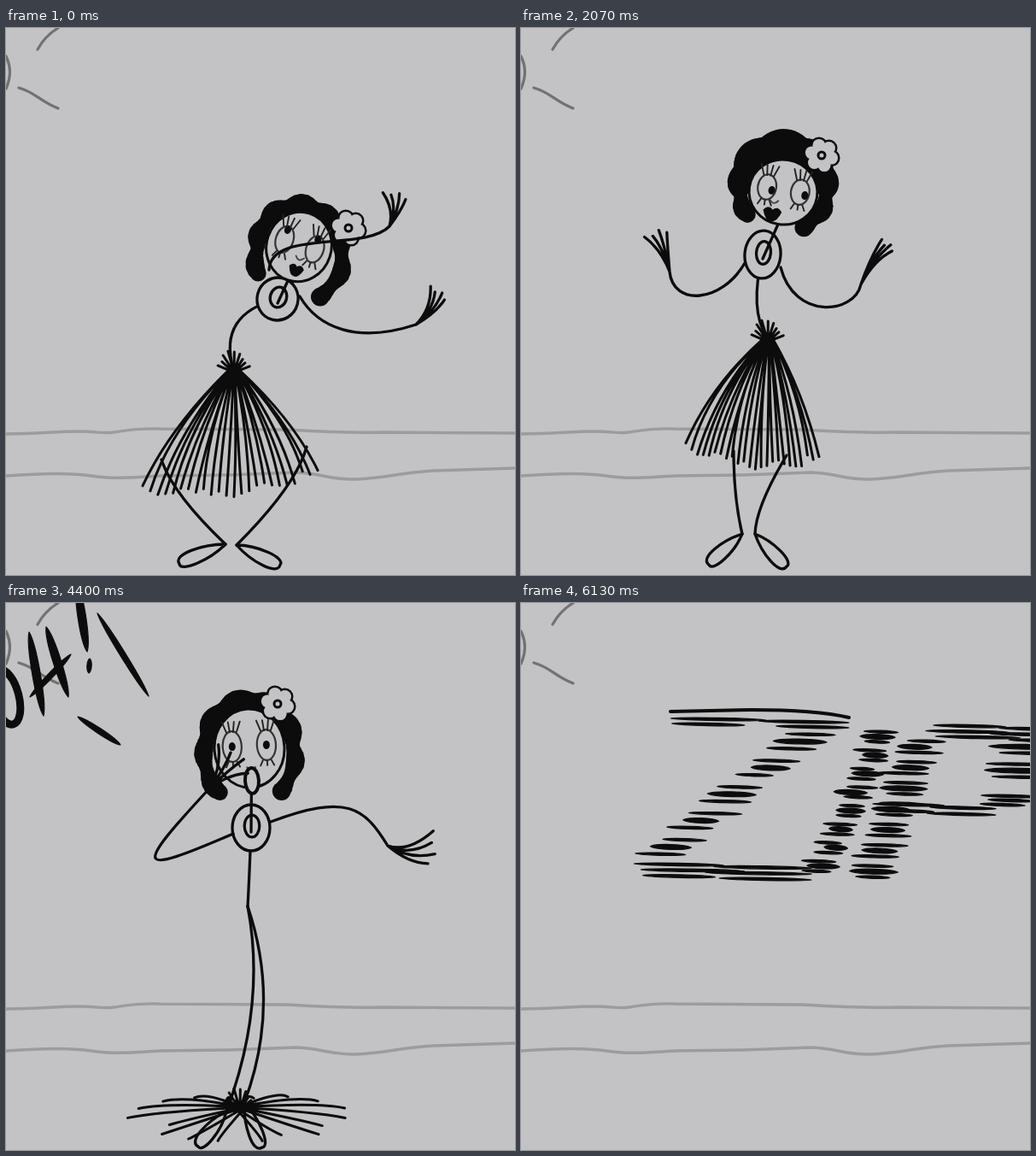
These frames come from a looping animation (596 by 640 pixels, 6.19 s). An HTML page:

```html
<!DOCTYPE html>
<html lang="en">
<head>
<meta charset="utf-8">
<title>Hula dancer</title>
<style>
html, body { margin: 0; width: 100%; height: 100%; overflow: hidden; background: #c3c3c5; }
svg { display: block; width: 100vw; height: 100vh; }
path, ellipse { stroke-linecap: round; stroke-linejoin: round; }
</style>
</head>
<body>
<svg viewBox="0 0 596 640" preserveAspectRatio="xMidYMid slice">
  <g fill="none" stroke="#9c9c9d" stroke-width="3.4">
    <path d="M0 475C35 475 60 472 85 472S112 475 126 473S150 468 180 469L330 470Q400 474 440 473L596 474"/>
    <path d="M0 524C40 521 75 520 100 524S150 526 180 524L260 523L340 520C370 521 380 529 410 528S465 520 500 518L596 515"/>
  </g>
  <path fill="none" stroke="#727273" stroke-width="3.2" d="M0 33Q9 51 0 71M61 0Q46 9 37 25M15 70C34 75 40 86 61 94"/>
  <g id="dancer" fill="none" stroke="#0c0c0c" stroke-width="3.3"></g>
  <g id="words" fill="#0c0c0c"></g>
</svg>
<script>
const LOOP = 6190, STEP = 66.67, PAPER = '#c3c3c5', INK = '#0c0c0c';
const dancer = document.getElementById('dancer');
const words = document.getElementById('words');

// head, lei: x y rx ry tilt     hair: left end, right end (degrees), cap, lock length
// arms: cubic curve             hands: finger angle, spread, length
// legs: hip, bend, ankle, toe   skirt: waist, left hem, right hem
const pose = parts => ({
  features: 0, look: [0, 0], mouth: [0, 28, 9, 7], hair: [145, 65, 4, .2],
  droop: .45, strands: 24, flat: 0, ...parts
});

const right = pose({
  head: [343, 256, 38, 41, 18], look: [0, -12], mouth: [5, 27, 9, 7],
  hair: [147, 67, 1, .3], flower: [401, 234],
  lei: [318, 317, 24, 25, 15], bend: [248, 335], waist: [266, 398],
  armL: [308, 283, 310, 235, 420, 262, 449, 232], handL: [-80, 42, 40],
  armR: [344, 314, 365, 350, 410, 370, 480, 347], handR: [-55, 28, 48],
  legL: [182, 505, 195, 545, 257, 604, 203, 627], legR: [352, 490, 340, 535, 270, 605, 321, 628],
  skirt: [267, 400, 160, 540, 365, 518], droop: .5
});
const left = pose({
  head: [319, 327, 41, 42, 10], look: [2, -12], mouth: [-3, 31, 9, 7],
  hair: [146, 73, 4, .3], flower: [354, 280],
  lei: [286, 394, 34, 21, -22], bend: [228, 425], waist: [223, 466],
  armL: [268, 380, 190, 372, 110, 388, 103, 432], handL: [52, 34, 52],
  armR: [313, 405, 360, 440, 370, 475, 298, 498], handR: [-200, 35, 40],
  legL: [145, 567, 195, 590, 262, 610, 203, 627], legR: [342, 525, 325, 556, 262, 610, 322, 624],
  skirt: [224, 468, 125, 576, 355, 542], droop: .3
});
const open = pose({
  head: [307, 192, 40, 38, 9], look: [6, 3], mouth: [-9, 27, 11, 8],
  hair: [145, 62, 16, 0], flower: [352, 149],
  lei: [283, 265, 21, 28, 5], bend: [267, 330], waist: [288, 362],
  armL: [262, 275, 235, 322, 178, 326, 174, 285], handL: [-110, 32, 50],
  armR: [304, 280, 320, 342, 390, 335, 398, 300], handR: [-56, 18, 58],
  legL: [249, 495, 249, 550, 259, 592, 220, 628], legR: [311, 500, 275, 560, 274, 592, 311, 630],
  skirt: [289, 364, 193, 490, 349, 502]
});
const reach = pose({
  head: [287, 174, 40, 38, 2], look: [0, 8], mouth: [1, 38, 6, 3],
  hair: [138, 45, 9, .15], flower: [317, 132],
  lei: [285, 263, 20, 27, 0], bend: [282, 320], waist: [280, 362],
  armL: [268, 240, 245, 190, 235, 140, 216, 5], handL: [-208, 32, 50],
  armR: [294, 240, 325, 200, 335, 165, 387, 5], handR: [27, 38, 53],
  legL: [280, 362, 278, 490, 264, 580, 228, 633], legR: [280, 362, 318, 470, 277, 580, 300, 637],
  skirt: [274, 590, 150, 616, 402, 612], strands: 18, flat: 1
});
const shock = {
  ...reach,
  head: [285, 170, 41, 46, -3], look: [0, 0], mouth: [1, 38, 8, 15],
  hair: [125, 52, 4, .2], flower: [318, 118],
  lei: [287, 263, 22, 27, 0], bend: [285, 320], waist: [283, 355],
  armL: [266, 270, 150, 320, 148, 314, 240, 215], handL: [-50, 60, 50],
  armR: [310, 256, 400, 222, 420, 240, 447, 284], handR: [3, 42, 56],
  legL: [283, 355, 305, 470, 258, 595, 225, 636], legR: [283, 355, 322, 470, 279, 585, 300, 637]
};
const shy = pose({
  head: [290, 266, 41, 26, 0], features: 10, look: [0, 9], mouth: [-3, 35, 6, 5],
  hair: [155, 35, 22, 0], flower: [319, 226],
  lei: [286, 302, 20, 20, 0], bend: [283, 360], waist: [281, 410],
  armL: [267, 300, 184, 360, 184, 364, 248, 418], handL: [-20, 55, 26],
  armR: [307, 305, 396, 350, 396, 354, 312, 420], handR: [200, 55, 24],
  legL: [253, 440, 246, 520, 257, 592, 222, 632], legR: [300, 440, 298, 530, 273, 590, 306, 635],
  skirt: [276, 420, 203, 512, 348, 525], strands: 16
});

const lerp = (a, b, t) => a + (b - a) * t;
function mix(a, b, t) {
  if (typeof a === 'number') return lerp(a, b, t);
  if (Array.isArray(a)) return a.map((v, i) => lerp(v, b[i], t));
  return Object.fromEntries(Object.keys(a).map(k => [k, mix(a[k], b[k], t)]));
}
const smooth = t => t * t * (3 - 2 * t);
const fall = t => t * t;

const dance = [[0, right], [420, mix(right, left, .6)], [840, mix(right, left, .25)], [1270, left],
  [1670, mix(left, open, .55)], [2070, open], [2400, mix(open, right, .25)], [2730, open]];
const bodyKeys = [...dance, [3130, reach], [3870, reach], [4200, shock], [4930, shock], [5340, shy], [LOOP, shy]];
const skirtKeys = [...dance, [2930, open], [3260, reach, fall], [5000, reach], [5340, shy], [LOOP, shy]];

function track(keys, ms) {
  const i = keys.findIndex(k => k[0] > ms);
  const [t0, a] = keys[i - 1], [t1, b, ease = smooth] = keys[i];
  return mix(a, b, ease((ms - t0) / (t1 - t0)));
}

const hash = n => { const s = Math.sin(n * 127.1 + 3.7) * 43758.5453; return s - Math.floor(s); };
const wobble = (n, size) => (hash(n) - .5) * 2 * size;
const rad = deg => deg * Math.PI / 180;
const polar = (x, y, deg, r) => [x + r * Math.cos(rad(deg)), y + r * Math.sin(rad(deg))];
const nums = (...v) => v.map(n => n.toFixed(2)).join(' ');
const line = (...v) => `M${nums(...v.slice(0, 2))}L${nums(...v.slice(2))}`;
const quad = (...v) => `M${nums(...v.slice(0, 2))}Q${nums(...v.slice(2))}`;
const cubic = (...v) => `M${nums(...v.slice(0, 2))}C${nums(...v.slice(2))}`;
const path = (d, attrs = '') => `<path d="${d}" ${attrs}/>`;
const oval = (x, y, rx, ry, tilt = 0, attrs = '') =>
  `<ellipse rx="${nums(rx)}" ry="${nums(ry)}" transform="translate(${nums(x, y)}) rotate(${nums(tilt)})" ${attrs}/>`;
const SOLID = `fill="${INK}" stroke="none"`, BLANK = `fill="${PAPER}" stroke="none"`;

// Fingers leave along the forearm, then fan out
function drawArm(arm, [angle, spread, length]) {
  const [cx, cy, x, y] = arm.slice(4);
  const forearm = Math.atan2(y - cy, x - cx) * 180 / Math.PI;
  let d = cubic(...arm);
  for (let i = 0; i < 4; i++) {
    const aim = angle + spread * (i / 3 - .5);
    const [kx, ky] = polar(x, y, aim, length * .3);
    d += quad(x, y, ...polar(kx, ky, forearm, length * .28), ...polar(x, y, aim, length * (1 - .08 * (i % 2))));
  }
  return path(d);
}

function drawLeg(leg) {
  const [ax, ay, tx, ty] = leg.slice(4);
  const len = Math.hypot(tx - ax, ty - ay), turn = Math.atan2(ty - ay, tx - ax) * 180 / Math.PI;
  return path(quad(...leg.slice(0, 6))) +
    `<g transform="translate(${nums(ax, ay)}) rotate(${nums(turn)})">` +
    path(cubic(0, 0, len * .4, 10, len * 1.05, 14, len, 0) + `C${nums(len * 1.05, -10, len * .4, -10, 0, 0)}`) + '</g>';
}

function drawSkirt({ skirt: [wx, wy, lx, ly, rx, ry], droop, strands, flat }) {
  const n = Math.round(strands);
  let d = '';
  for (let i = 0; i < n; i++) {
    const u = i / (n - 1), sag = 56 * u * (1 - u);
    const hemX = lerp(lx, rx, u), hemY = lerp(ly, ry, u) + sag + wobble(i, 6);
    const [fanX, fanY] = polar(0, 0, 75 - u * 330, .65 + .37 * hash(i + 7));
    const ex = lerp(hemX, wx + 130 * fanX, flat), ey = lerp(hemY, wy + 14 + 34 * fanY, flat);
    const bend = lerp(wy + (ey - wy) * droop, ey - 7, flat);
    d += quad(wx + (u - .5) * 12, wy, wx + (ex - wx) * .74 + wobble(i + 20, 4), bend, ex, ey);
  }
  for (let i = 0; i < 9; i++)
    d += line(wx, wy + 3, ...polar(wx, wy, -165 + i * 19, 14 + 9 * hash(i + 9)));
  return path(d, 'stroke-width="3"') + oval(wx, wy, 7, 6, 0, SOLID);
}

// A wavy band around the head, ending in two locks
function drawHair([cx, cy, rx, ry, tilt], [from, to, cap, drop]) {
  const count = 60;
  let s = '';
  for (let i = 0; i <= count; i++) {
    const angle = lerp(from, to + 360, i / count), up = -Math.sin(rad(angle));
    const wave = Math.sin(i * .75), stretch = 1 + drop * Math.max(0, -up);
    const size = 9.5 + cap * Math.max(0, up) + wave * 1.6;
    const [dx, dy] = polar(0, 0, angle, stretch);
    s += oval(cx + dx * (rx + 11 + wave), cy + dy * (ry + 8 + wave), size, size, 0, SOLID);
  }
  return s;
}

function drawFace({ head: [cx, cy, rx, ry, tilt], features, look: [px, py], mouth: [mx, my, mw, mh] }) {
  const ex = rx * .27, ey = ry * .39, fy = features - 3;
  let s = `<g transform="translate(${nums(cx, cy)}) rotate(${nums(tilt)})" stroke-width="2.2">` +
    oval(0, 0, rx, ry, 0, `fill="${PAPER}" stroke-width="3"`);
  for (const x of [-.49 * rx, .49 * rx]) {
    let lashes = '';
    for (let i = -1.5; i <= 1.5; i++) lashes += line(x + i * 4, fy - ey + 1, x + i * 7, fy - ey - 11);
    for (let i = -1; i <= 1; i++) lashes += line(x + i * 5, fy + ey, x + i * 8, fy + ey + 6);
    s += oval(x, fy, ex, ey, 0, 'stroke="#333"') + oval(x + px, fy + py, 4, 5, 0, SOLID) +
      path(lashes, 'stroke="#222" stroke-width="1.9"');
  }
  s += path(quad(mx - 5, my - 16, mx, my - 9, mx + 5, my - 16), 'stroke="#444" stroke-width="1.8"');
  if (mh > 11) s += oval(mx, my, mw, mh, 0, `fill="${PAPER}" stroke-width="4"`);
  else s += `<g transform="translate(${nums(mx, my)}) scale(${nums(mw, mh)})">` +
    path('M-1-.4Q-.5-1.3 0-.6Q.5-1.3 1-.4Q.6 1.2 0 1.1Q-.6 1.2-1-.4Z', SOLID) + '</g>';
  return s + '</g>';
}

function drawFlower([x, y]) {
  const petals = attrs => [0, 1, 2, 3, 4, 5].map(i =>
    oval(...polar(x, y, i * 60 + 15, 12), 7.5, 7.5, 0, attrs)).join('');
  return petals('stroke-width="5"') + petals(BLANK) + oval(x, y, 9, 9, 0, BLANK) + oval(x, y, 4, 4, 0, 'stroke-width="3"');
}

function drawDancer(p, skirtPose) {
  const [x, y, rx, ry, tilt] = p.lei, [hx, hy, , chin, nod] = p.head;
  return drawLeg(p.legL) + drawLeg(p.legR) + path(quad(x, y, ...p.bend, ...p.waist)) + drawSkirt(skirtPose) +
    oval(x, y, rx, ry, tilt, `fill="${PAPER}"`) + oval(x + 1, y - 2, rx * .4, ry * .48, tilt) +
    path(line(...polar(hx, hy, 90 + nod, chin), x, y + 5)) +
    drawHair(p.head, p.hair) + drawFace(p) + drawFlower(p.flower) +
    drawArm(p.armL, p.handL) + drawArm(p.armR, p.handR);
}

// A brush mark, pointed at both ends
function brush(x1, y1, x2, y2, w) {
  const len = Math.hypot(x2 - x1, y2 - y1);
  const nx = (y1 - y2) / len * w * .7, ny = (x2 - x1) / len * w * .7;
  const at = (t, s) => [lerp(x1, x2, t) + nx * s, lerp(y1, y2, t) + ny * s];
  return path(cubic(x1, y1, ...at(.15, 1), ...at(.85, 1), x2, y2) +
    `C${nums(...at(.85, -1), ...at(.15, -1), x1, y1)}Z`, `stroke="${INK}" stroke-width="1.2"`);
}

// Speed lines: a slanted stem in clumps of three, or a flat bar
function stem(x1, y1, x2, y2, clumps, width, seed) {
  let s = '';
  for (let i = 0; i < clumps * 3; i++) {
    const t = (Math.floor(i / 3) + (i % 3) * .27) / (clumps - .46), half = width * (.38 + .2 * hash(seed + i));
    const x = lerp(x1, x2, t) + wobble(seed + i + 50, 7), y = lerp(y1, y2, t);
    s += brush(x - half, y, x + half, y + 1.5, i % 3 === 1 ? 5.5 : 3);
  }
  return s;
}
function bar(x1, x2, y1, y2, rows, seed) {
  let s = '';
  for (let i = 0; i < rows; i++) {
    const y = lerp(y1, y2, i / (rows - 1)), width = (x2 - x1) * (.4 + .2 * hash(seed + i));
    const x = i % 2 ? x2 - width : x1 + (x2 - x1) * .12 * hash(seed + i + 30);
    s += brush(x, y, x + width, y + 2, 3.2);
  }
  return s;
}

const shout = oval(0, 110, 15, 33, -15, `fill="none" stroke="${INK}" stroke-width="9"`) +
  brush(27, 34, 44, 132, 9) + brush(47, 28, 73, 110, 9) + brush(28, 110, 76, 60, 6) +
  brush(83, -22, 95, 57, 9) + brush(98, 65, 97, 82, 5) +
  brush(107, 12, 167, 109, 6) + brush(84, 133, 134, 166, 6);

const letterZ = path('M175 127L270 125Q345 125 384 134', `fill="none" stroke="${INK}" stroke-width="4"`) +
  bar(172, 384, 135, 144, 4, 3) + stem(333, 153, 168, 293, 5, 54, 11) + bar(132, 340, 305, 322, 6, 17);
const letterI = stem(425, 150, 350, 313, 8, 36, 31);
const letterP = stem(468, 161, 410, 320, 7, 52, 71) + bar(467, 640, 143, 156, 5, 23) +
  stem(600, 160, 585, 203, 2, 80, 91) + bar(535, 660, 225, 235, 5, 41) + bar(410, 556, 235, 246, 4, 57);

function draw(frame) {
  const ms = Math.min(frame * STEP, LOOP - 1), gone = frame >= 90;
  dancer.innerHTML = gone ? '' : drawDancer(track(bodyKeys, ms), track(skirtKeys, ms));
  if (gone) words.innerHTML = `<g transform="translate(${(frame - 92) * 40} 0)">${letterZ + letterI + letterP}</g>`;
  else words.innerHTML = frame >= 63 && frame < 73 ? shout : '';
}

let shown = -1;
function tick() {
  const frame = Math.min(92, Math.floor((performance.now() % LOOP + 4) / STEP));
  if (frame !== shown) draw(shown = frame);
  requestAnimationFrame(tick);
}
tick();
</script>
</body>
</html>
```
